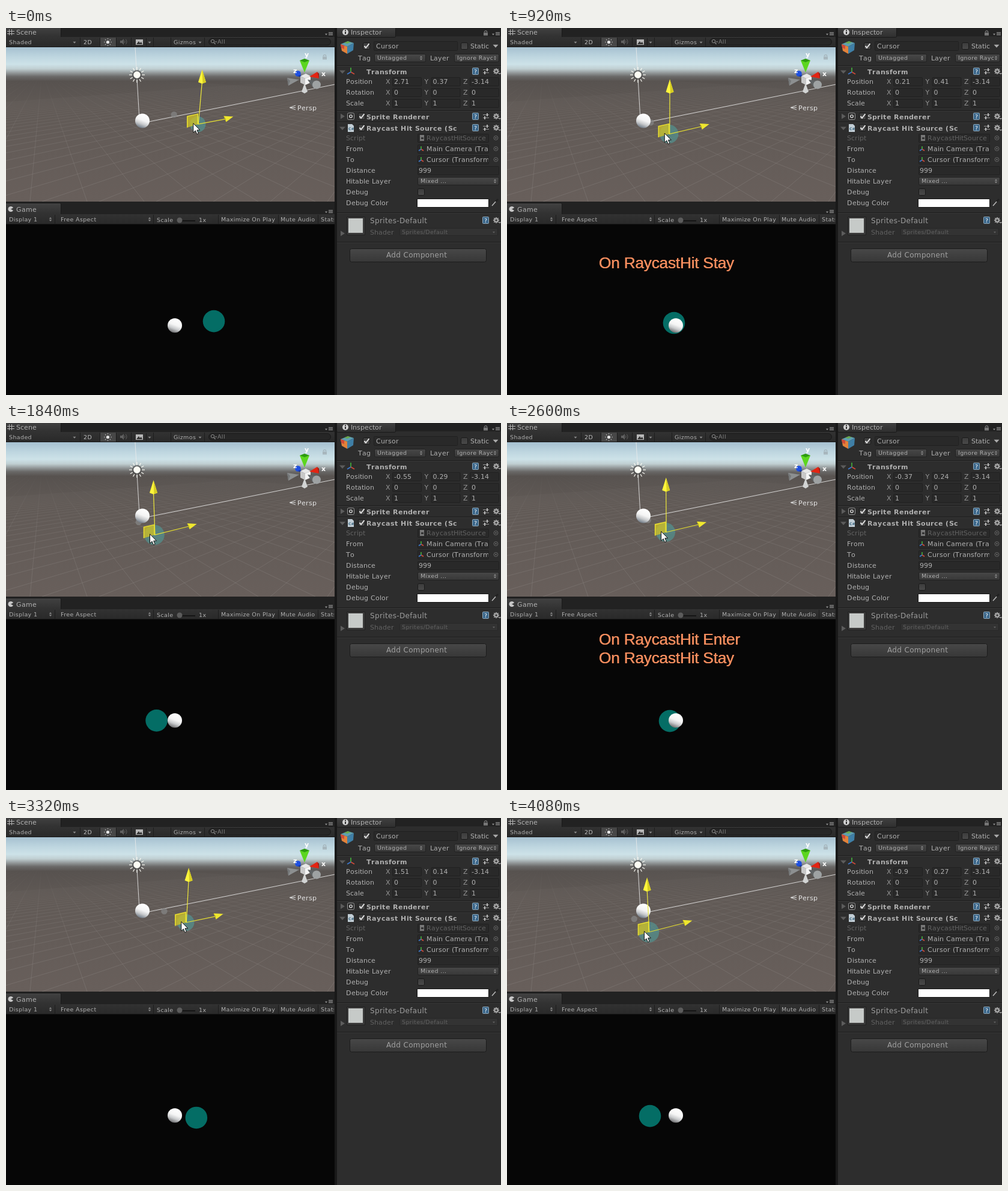
An HTML page with a canvas that plays this animation: 824 px wide and 611 px high, repeating every 4.36 s.

```html
<!DOCTYPE html>
<html lang="en">
<head>
<meta charset="utf-8">
<title>Raycast hit demo</title>
<style>
html, body { margin: 0; width: 100%; height: 100%; overflow: hidden; background: #282828; }
canvas { display: block; }
</style>
</head>
<body>
<canvas id="stage" width="824" height="611"></canvas>
<script>
const W = 824, H = 611, LOOP = 4360, STEP = 40;
const stage = document.getElementById('stage').getContext('2d');
const backdrop = document.createElement('canvas');
backdrop.width = W;
backdrop.height = H;
let c = backdrop.getContext('2d');

// font, letter spacing, and how glyph advances snap to whole pixels
const UI = '"DejaVu Sans", sans-serif';
const STYLES = {
  body: ['11px ' + UI, '0px', w => Math.round(w + 0.1)],
  bold: ['bold 11px ' + UI, '0px', Math.ceil],
  small: ['9.5px ' + UI, '0.37px'],
  large: ['12px ' + UI, '0.35px'],
  game: ['26.3px "Liberation Sans", Arial, sans-serif', '-0.25px']
};
const INK = '#b0b0b0', DIM = '#626262', DARK = '#1d1d1d';

function rect(x, y, w, h, fill) {
  c.fillStyle = fill;
  c.fillRect(x, y, w, h);
}
function box(x, y, w, h, fill, stroke, r = 0) {
  c.beginPath();
  c.roundRect(x + 0.5, y + 0.5, w - 1, h - 1, r);
  c.fillStyle = fill;
  c.fill();
  if (stroke) { c.strokeStyle = stroke; c.lineWidth = 1; c.stroke(); }
}
function poly(fill, ...p) {
  c.beginPath();
  for (let i = 0; i < p.length; i += 2) c.lineTo(p[i], p[i + 1]);
  c.closePath();
  c.fillStyle = fill;
  c.fill();
}
function line(color, width, ...p) {
  c.beginPath();
  for (let i = 0; i < p.length; i += 2) c.lineTo(p[i], p[i + 1]);
  c.strokeStyle = color;
  c.lineWidth = width;
  c.stroke();
}
function disc(x, y, r, fill) {
  c.beginPath();
  c.arc(x, y, r, 0, 7);
  c.fillStyle = fill;
  c.fill();
}
function text(s, x, y, style = 'body', color = INK, maxX = W) {
  const [font, spacing, snap] = STYLES[style];
  c.save();
  c.beginPath();
  c.rect(0, 0, maxX, H);
  c.clip();
  c.font = font;
  c.letterSpacing = spacing;
  c.fillStyle = color;
  if (snap) {
    for (const ch of s) {
      c.fillText(ch, x, y);
      x += snap(c.measureText(ch).width);
    }
  } else c.fillText(s, x, y);
  c.restore();
}
function vertical(y0, y1, ...stops) {
  const g = c.createLinearGradient(0, y0, 0, y1);
  stops.forEach((s, i) => Array.isArray(s) ? g.addColorStop(...s) : g.addColorStop(i / (stops.length - 1), s));
  return g;
}

// ---- small icons ----
const down = (x, y, s = 3, col = '#8a8a8a') => poly(col, x - s, y - s / 2, x + s, y - s / 2, x, y + s / 2 + 0.5);
const right = (x, y) => poly('#5c5c5c', x - 3, y - 4.5, x + 4, y, x - 3, y + 4.5);
function updown(x, y, col = '#8a8a8a') {
  poly(col, x - 2.2, y - 0.8, x + 2.2, y - 0.8, x, y - 3.4);
  poly(col, x - 2.2, y + 0.8, x + 2.2, y + 0.8, x, y + 3.4);
}
function menu(x, y) {
  down(x - 5, y + 1.5, 2, '#999');
  for (let i = 0; i < 3; i++) rect(x - 1, y - 2 + i * 2, 7, 1, '#999');
}
function lock(x, y, col) {
  rect(x - 3, y - 0.5, 7, 5, col);
  c.beginPath();
  c.arc(x + 0.5, y - 1, 2.3, Math.PI, 0);
  c.strokeStyle = col;
  c.lineWidth = 1.2;
  c.stroke();
}
function check(x, y, on) {
  box(x, y, 12, 12, vertical(y, y + 12, '#3c3c3c', '#4a4a4a'), '#191919', 2);
  if (on) line('#e0e0e0', 2, x + 2.5, y + 6, x + 5, y + 9, x + 10.5, y + 2);
}
function axes(x, y, s) {
  line('#45b53c', 1.6, x, y + s * 0.2, x, y - s);
  line('#d24a38', 1.6, x, y + s * 0.2, x + s, y + s * 0.8);
  line('#3c7ad0', 1.6, x, y + s * 0.2, x - s, y + s * 0.8);
}
function gear(x, y) {
  for (let i = 0; i < 8; i++) {
    const a = i * Math.PI / 4;
    line('#a8a8a8', 1.8, x, y, x + 5 * Math.cos(a), y + 5 * Math.sin(a));
  }
  disc(x, y, 3.6, '#a8a8a8');
  disc(x, y, 1.6, '#2d2d2d');
  down(x + 6, y + 4, 2, '#aaa');
}
function tools(y, mid = true) {
  const x = mid ? 776 : 793;
  box(x, y - 6, 11, 12, '#3a668a', '#93acbd', 1);
  text('?', x + 3, y + 4, 'small', '#fff');
  if (mid) {
    line('#9a9a9a', 1, 794, y - 2.5, 804, y - 2.5);
    line('#9a9a9a', 1, 794, y + 2.5, 804, y + 2.5);
    rect(800, y - 5, 2, 5, '#b8b8b8');
    rect(796, y, 2, 5, '#b8b8b8');
  }
  gear(816, y);
}
function picker(y) {
  c.beginPath();
  c.arc(815.5, y, 3.4, 0, 7);
  c.strokeStyle = '#707070';
  c.lineWidth = 0.9;
  c.stroke();
  disc(815.5, y, 0.9, '#888');
}
function sun(x, y, r, col, n, reach, width = 1.5) {
  for (let i = 0; i < n; i++) {
    const a = i * 2 * Math.PI / n, p = Math.cos(a), q = Math.sin(a);
    line(col, width, x + p * (r + 2.5), y + q * (r + 2.5), x + p * reach, y + q * reach);
  }
  disc(x, y, r, col);
}
const field = (x, y, w, h = 15) => box(x, y, w, h, '#292929', '#202020', 1);
const popup = (x, y, w) => box(x, y, w, 14, vertical(y, y + 14, '#484848', '#373737'), '#202020', 2);
function rule(y) {
  rect(551, y, 273, 1, '#1c1c1c');
  rect(551, y + 1, 273, 1, '#383838');
}

// ---- editor panels ----
function drawBars() {
  rect(0, 0, W, H, '#222');
  const tab = (x, y, w, h) => box(x, y - 2, w, h + 4, vertical(y, y + h, '#404040', '#303030'), '#191919', 2);
  tab(-2, 0, 94, 16);
  tab(-2, 293, 94, 18);
  for (const y of [15, 310]) {
    rect(0, y, 547, 17, vertical(y, y + 17, '#323232', '#292929'));
    rect(0, y + 16, 547, 1, '#181818');
  }
  for (let i = 0; i < 2; i++) {
    line(INK, 1, 5.5 + i * 4, 2, 5.5 + i * 4, 12);
    line(INK, 1, 2, 5.5 + i * 4, 14, 5.5 + i * 4);
  }
  text('Scene', 17, 11);
  text('Shaded', 5, 27, 'small');
  down(114, 24, 2.5);
  rect(157, 16, 26, 15, '#474747');
  for (const x of [123, 156, 183, 208, 245, 274, 330]) rect(x, 16, 1, 15, DARK);
  text('2D', 129, 27, 'small', '#c0c0c0');
  sun(169.5, 23.5, 2.6, '#e4e4e4', 8, 6);
  poly('#606060', 190, 21, 193, 21, 196, 18, 196, 28, 193, 25, 190, 25);
  for (const r of [3, 6]) {
    c.beginPath();
    c.arc(195, 23, r, -0.8, 0.8);
    c.strokeStyle = '#606060';
    c.lineWidth = 1;
    c.stroke();
  }
  rect(216, 19, 12, 9, '#b8b8b8');
  poly('#333', 217, 27, 221, 22, 223, 25, 225, 23, 227, 27);
  rect(233, 17, 1, 13, DARK);
  down(239, 24, 2.5);
  text('Gizmos', 279, 27, 'small');
  down(323, 24, 2.5);
  box(337, 17, 204, 12, '#262626', '#191919', 6);
  c.beginPath();
  c.arc(344, 22, 2.7, 0, 7);
  c.strokeStyle = '#888';
  c.stroke();
  line('#888', 1.2, 346, 24, 348.5, 27);
  down(349.5, 23, 1.6);
  text('All', 352, 26, 'small', '#808080');
  menu(538, 9);

  disc(8, 301.5, 4.5, '#c8c8c8');
  poly('#383838', 8, 301.5, 13.5, 298.5, 13.5, 304.5);
  text('Game', 17, 306);
  menu(538, 305);
  text('Display 1', 5, 322, 'small');
  updown(74, 318.5);
  text('Free Aspect', 91, 322, 'small');
  updown(239, 318.5);
  text('Scale', 251, 323, 'small');
  rect(285, 320, 30, 2, '#151515');
  disc(289, 320, 4.5, '#5c5c5c');
  text('1x', 321, 323, 'small');
  text('Maximize On Play', 358, 322, 'small');
  text('Mute Audio', 457, 322, 'small');
  text('Stats', 524, 322, 'small', INK, 546);
  for (const x of [81, 245, 353, 453, 519]) rect(x, 311, 1, 15, DARK);
  rect(0, 327, 547, H - 327, '#060606');
}

function drawInspector() {
  rect(551, 0, 273, H, '#2d2d2d');
  rect(551, 0, 273, 14, '#222');
  box(550, -2, 99, 18, vertical(0, 15, '#404040', '#2f2f2f'), '#191919', 2);
  rect(547, 0, 4, H, '#191919');
  disc(565, 7, 5, '#d0d0d0');
  rect(564, 6, 2, 4, '#333');
  rect(564, 3, 2, 2, '#333');
  text('Inspector', 574, 11);
  lock(798, 8, '#777');
  menu(816, 9);

  poly('#5f9fb0', 557, 27, 569, 22, 579, 25, 568, 31);
  poly('#e2823a', 557, 27, 568, 31, 568, 43, 559, 38);
  poly('#3f7fa6', 568, 31, 579, 25, 578, 37, 568, 43);
  poly('#69a94a', 563, 24.5, 569, 22, 574, 23.5, 568, 26);
  poly('#cf4a38', 557, 27, 563, 29, 563, 35, 558, 33);
  check(594, 24, true);
  field(612, 22, 140, 16);
  text('Cursor', 616, 34);
  check(757, 24, false);
  text('Static', 773, 34);
  down(815, 30, 4.5, '#aaa');
  text('Tag', 586, 54);
  popup(613, 43, 86);
  text('Untagged', 618, 53, 'small');
  updown(691, 50);
  text('Layer', 706, 54);
  popup(746, 43, 75);
  text('Ignore Raycast', 751, 53, 'small', INK, 811);
  updown(814, 50);

  rule(62);
  down(560, 73, 5, '#5c5c5c');
  axes(574, 72, 6);
  text('Transform', 600, 77, 'bold');
  tools(72);
  ['Position', 'Rotation', 'Scale'].forEach((name, i) => {
    const y = 93 + 18 * i;
    text(name, 566, y);
    ['X', 'Y', 'Z'].forEach((axis, k) => {
      text(axis, 632 + 64.5 * k, y, 'body', '#949494');
      field(643 + 64.5 * k, y - 11, 49);
      if (i) text(String(i - 1), 646 + 64.5 * k, y);
    });
  });
  text('-3.14', 775, 93);

  rule(137);
  right(560, 147);
  box(568, 141, 12, 12, '#292929', '#999', 2);
  disc(574, 147, 3, '#c8c8c8');
  disc(574, 147, 1.4, '#222');
  check(586, 141, true);
  text('Sprite Renderer', 600, 152, 'bold');
  tools(147);
  rule(156);
  down(560, 167, 5, '#5c5c5c');
  poly('#c2ced6', 569, 160, 576, 160, 579, 163, 579, 173, 569, 173);
  c.font = 'bold 6px ' + UI;
  c.fillStyle = '#34617c';
  c.fillText('C#', 570, 170);
  check(586, 160, true);
  text('Raycast Hit Source (Script)', 600, 171, 'bold', INK, 750);
  tools(166);

  const rows = ['Script', 'From', 'To', 'Distance', 'Hitable Layer', 'Debug', 'Debug Color'];
  rows.forEach((s, i) => text(s, 566, 187 + 18 * i, 'body', i ? INK : DIM));
  ['RaycastHitSource', 'Main Camera (Transform)', 'Cursor (Transform)'].forEach((s, i) => {
    const y = 187 + 18 * i;
    field(685, y - 11, 119);
    text(s, 700, y, 'body', i ? INK : DIM, 803);
    if (i) axes(691, y - 4, 4);
    else {
      rect(689, 178, 7, 10, '#777');
      rect(691, 182, 4, 3, '#333');
    }
    picker(y - 4);
  });
  field(685, 230, 136);
  text('999', 687, 241);
  popup(685, 248, 136);
  text('Mixed ...', 690, 258, 'small');
  updown(814, 255);
  check(685, 267, false);
  box(684, 284, 120, 15, '#fff', '#151515');
  line('#bbb', 1.5, 809, 296, 816, 288);
  line('#222', 3, 815, 289, 819, 285);

  rule(307);
  box(567, 314, 31, 31, '#3b3b3b', '#202020');
  rect(570, 317, 24, 24, '#c6cac8');
  text('Sprites-Default', 606, 325, 'large', '#9c9c9c');
  text('Shader', 606, 344, 'body', DIM);
  box(655, 333, 164, 13, '#333', '#272727', 2);
  text('Sprites/Default', 659, 343, 'small', DIM);
  down(812, 340, 2, DIM);
  right(560, 342);
  tools(320, false);
  rule(356);
  box(572, 367, 228, 23, vertical(367, 390, '#484848', '#373737'), '#1c1c1c', 3);
  text('Add Component', 633, 382, 'large', '#a0a0a0');
}

function drawScene() {
  c.save();
  c.beginPath();
  c.rect(0, 32, 547, 257);
  c.clip();
  rect(0, 32, 547, 257, vertical(32, 289, [0, '#a6c0d0'], [0.06, '#bdd5df'], [0.11, '#cde2e8'],
    [0.14, '#c0cfd2'], [0.165, '#959b9c'], [0.19, '#6a6968'], [0.22, '#57524f'], [0.4, '#615a56'], [1, '#685f5b']));
  const grid = vertical(80, 289, 'rgba(150,145,142,0)', 'rgba(150,145,142,.24)', 'rgba(150,145,142,.3)');
  for (let i = -14; i < 32; i++) line(grid, 1, 60, 72, 40 + 95 * i, 289);
  for (let i = -24; i < 14; i++) line(grid, 1, 695, 72, 60 + 95 * i, 289);

  line('rgba(235,235,235,.85)', 1, 215, 32, 222, 152);
  line('rgba(235,235,235,.85)', 1, 238, 156, 547, 94);
  disc(218, 78, 8, 'rgba(70,70,70,.6)');
  sun(218, 78, 5.8, '#fbfbf4', 12, 13, 1.2);

  poly('#8c8f90', 468, 83, 488, 86, 470, 96);
  poly('#747778', 468, 83, 473, 88, 470, 96);
  disc(486, 76, 4.8, '#1d4fe0');
  poly('#12319c', 485, 80, 491, 78, 493, 82);
  poly('#d2d4d4', 497, 92, 502, 106, 497, 109, 492, 106);
  poly('#5cd61f', 489, 54, 505, 54, 497, 74);
  poly('#2d9a10', 489, 54, 497, 51, 505, 54, 497, 57);
  poly('#e8e8e8', 490, 80, 499, 76, 507, 80, 498, 84);
  poly('#c8c8c8', 490, 80, 498, 84, 498, 95, 490, 91);
  poly('#f4f4f4', 498, 84, 507, 80, 507, 91, 498, 95);
  poly('#e32412', 505, 81, 518, 73, 521, 84);
  poly('#a61208', 518, 73, 521, 76, 521, 84);
  poly('#606466', 502, 86, 522, 88, 512, 101);
  disc(517, 94.5, 7, '#9ea2a3');
  text('y', 497, 48, 'bold', '#fff');
  text('x', 525, 80, 'bold', '#fff');
  text('z', 478, 75, 'bold', '#fff');
  lock(530, 48, 'rgba(150,160,165,.6)');
  line('#d8d8d8', 1, 482, 129, 472, 132.5, 482, 136);
  line('#d8d8d8', 1, 472, 132.5, 482, 132.5);
  text('Persp', 485, 137, 'body', '#e4e4e4');
  c.restore();
}

// ---- motion: time, world x, world y ----
const PATH = [
  [-80, 2.71, .37], [0, 2.1, .49], [160, 1.45, .53], [360, .9, .49], [480, .66, .44], [520, .21, .41],
  [1240, .21, .41], [1360, .16, .43], [1440, -.06, .36], [1600, -.42, .31], [1720, -.55, .29],
  [2360, -.55, .29], [2520, -.37, .24], [2600, .017, .27], [2720, .66, .2], [2880, 1.2, .16],
  [3240, 1.51, .14], [3320, 1.29, .19], [3480, 1.08, .24], [3600, .78, .29], [3640, .45, .32],
  [3680, -.08, .34], [3720, -.36, .33], [3800, -.79, .285], [3960, -.9, .27], [LOOP, -.9, .27]
];
const HITS = [[520, 1440], [2560, 2720], [3640, 3680]];
const HOLD = 40, FADE = 360, LAG = 80;

function at(t) {
  const i = Math.max(1, PATH.findIndex(p => p[0] >= t));
  const a = PATH[i - 1], b = PATH[i], k = (t - a[0]) / (b[0] - a[0]);
  return [a[1] + (b[1] - a[1]) * k, a[2] + (b[2] - a[2]) * k];
}
const fade = age => Math.max(0, Math.min(1, 1 - (age - HOLD) / FADE));

// lit from above, slightly from the right
function ball(x, y, r, shade) {
  const g = c.createLinearGradient(x + r * 0.35, y - r * 0.9, x - r * 0.35, y + r * 0.95);
  g.addColorStop(0, '#fff');
  g.addColorStop(0.45, '#f4f4f4');
  g.addColorStop(0.7, '#c9cbcd');
  g.addColorStop(1, shade);
  disc(x, y, r, g);
}

function drawGizmo(gx, gy) {
  const u = gx - 270, v = gy - 495;
  const x = 263.3 + 0.82 * u - 0.0011 * u * u;
  const y = 181.4 - 0.235 * u + 0.0003 * u * u + 0.75 * v;
  disc(0.815 * x + 19.5, 0.8 * y + 16, 5.2, 'rgba(132,132,132,.75)');
  ball(227, 154.5, 12, '#6f7a86');
  disc(x, y, 15.6 - 0.05 * (x - 270), 'rgba(82,150,147,.68)');

  const tx = x + 0.8 + (x - 266) * 0.12, ty = y - 91;
  line('#f0ea3a', 1.2, x + 1, y, tx, ty + 20);
  poly('#fdf53c', tx - 6.5, ty + 21, tx, ty, tx + 6.5, ty + 21, tx, ty + 23.5);
  poly('#d6cd22', tx + 1, ty + 23, tx, ty, tx + 6.5, ty + 21);

  const ax = x + 67 - 0.16 * (x - 270), ay = y - 17 + (x - 264) * 0.08;
  line('#e6df30', 1.2, x, y, ax - 13, ay + 4);
  poly('#efe72f', ax - 16, ay - 1, ax, ay, ax - 12, ay + 9);
  poly('#b8af1c', ax - 16, ay - 1, ax - 13, ay + 3, ax - 12, ay + 9);

  poly('rgba(206,192,38,.78)', x, y, x, y - 17, x - 17.5, y - 13, x - 17.5, y + 5.5);
  line('#e9e030', 1.5, x - 17.5, y + 5.5, x - 17.5, y - 13, x, y - 17, x, y);

  const px = x - 7.5, py = y - 1.5;
  const arrow = [0, 0, 0, 15.5, 3.6, 12.2, 6, 18, 8.6, 16.9, 6.2, 11.3, 11, 11.3];
  const p = arrow.map((n, i) => n + (i % 2 ? py : px));
  poly('#fff', ...p);
  line('#111', 1, ...p, px, py);
}

function caption(s, y, alpha) {
  const color = '#f58d5e';
  c.globalAlpha = alpha;
  text(s, 152.8, y, 'game', color);
  text(s, 153.3, y, 'game', color);
  c.globalAlpha = 1;
}

function draw(time) {
  const t = Math.floor(time % LOOP / STEP) * STEP;
  const [x, y] = at(t), [shownX, shownY] = at(t - LAG);
  const gx = 270.4 + 36 * x, gy = 505.8 - 36 * y;
  c.drawImage(backdrop, 0, 0);
  drawGizmo(gx, gy);
  disc(gx, gy, 18.3, '#046d65');
  ball(281, 495.3, 12, '#6c6c6e');
  text(String(+shownX.toFixed(2)), 646, 93);
  text(String(+shownY.toFixed(2)), 710.5, 93);

  const hit = HITS.filter(h => h[0] <= t).pop();
  if (hit) {
    const [enter, exit] = hit;
    const glow = [fade(t - enter), fade(t - exit), t < exit ? 0 : fade(t - exit)];
    ['Enter', 'Stay', 'Exit'].forEach((word, i) => {
      if (glow[i]) caption('On RaycastHit ' + word, 369 + 31 * i, glow[i]);
    });
  }
}

drawBars();
drawScene();
drawInspector();
c = stage;
let start;
function tick(now) {
  start ??= now;
  draw(now - start);
  requestAnimationFrame(tick);
}
draw(0);
requestAnimationFrame(tick);
</script>
</body>
</html>
```
